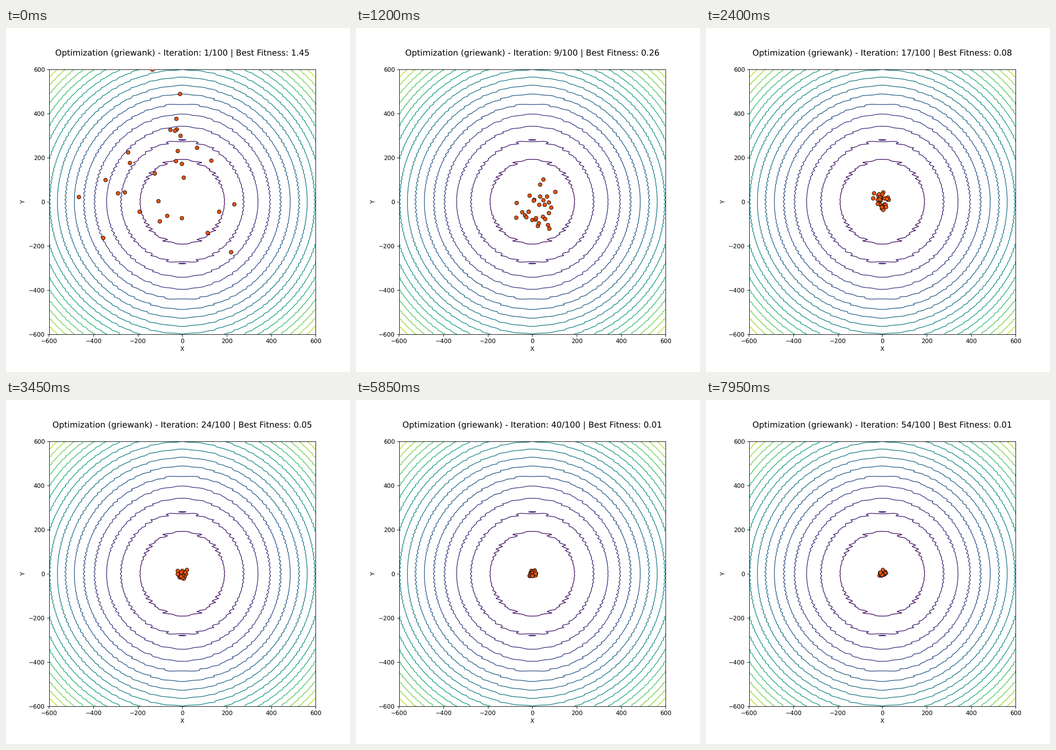
These frames come from a looping animation (748x748 px, 8000 ms). A matplotlib script:

```python
import matplotlib.pyplot as plt
import numpy as np
from matplotlib.animation import FuncAnimation

INTERVAL = 50
FRAMES = 160
FRAMES_PER_STEP = 3
PARTICLES = 30
BOUND = 600

# Iteration from which each best fitness holds.
BEST = {1: 1.45, 4: 0.62, 9: 0.26, 13: 0.17, 16: 0.08, 20: 0.05, 36: 0.01}

# Unhinted glyphs keep their true proportions at a fractional dpi.
plt.rcParams["text.hinting"] = "none"
plt.rcParams["text.hinting_factor"] = 1

rng = np.random.default_rng(7)


def standard_normal_cloud():
    """Random points with exactly zero mean and unit spread."""
    cloud = rng.normal(size=(PARTICLES, 2))
    return (cloud - cloud.mean(axis=0)) / cloud.std(axis=0)


start, swing = standard_normal_cloud(), standard_normal_cloud()
speed = rng.uniform(0.7, 1.9, (PARTICLES, 1))


def griewank(x, y):
    return 1 + (x**2 + y**2) / 4000 - np.cos(x) * np.cos(y / np.sqrt(2))


def swarm(step):
    """Particles swing about a centre that overshoots the optimum and settles."""
    centre = np.array([-74, 127]) * np.exp(-step / 5) * np.cos(np.pi * step / 8)
    spread = np.array([160, 192]) * np.exp(-step / 6) + 7
    phase = speed * step
    offsets = start * np.cos(phase) + swing * np.sin(phase)
    return np.clip(centre + spread * offsets, -BOUND, BOUND)


def title_text(iteration):
    best = [value for first, value in BEST.items() if first <= iteration][-1]
    return (f"Optimization (griewank) - Iteration: {iteration}/100"
            f" | Best Fitness: {best:.2f}")


fig, ax = plt.subplots(figsize=(8, 8), dpi=93.5)
axis = np.linspace(-BOUND, BOUND, 200)
X, Y = np.meshgrid(axis, axis)
ax.contour(X, Y, griewank(X, Y), levels=20, cmap="viridis", linewidths=1.2)
ax.set(xlabel="X", ylabel="Y", xlim=(-BOUND, BOUND), ylim=(-BOUND, BOUND))
title = ax.text(0.5, 1.05, "", transform=ax.transAxes, ha="center", fontsize=14)
dots = ax.scatter(*swarm(0).T, s=40, c="#e6550d", edgecolors="black",
                  linewidths=0.7, zorder=3)


def update(frame):
    step = frame // FRAMES_PER_STEP
    dots.set_offsets(swarm(step))
    title.set_text(title_text(step + 1))
    return dots, title


anim = FuncAnimation(fig, update, frames=FRAMES, interval=INTERVAL,
                     repeat=True, repeat_delay=0)
plt.show()
```
